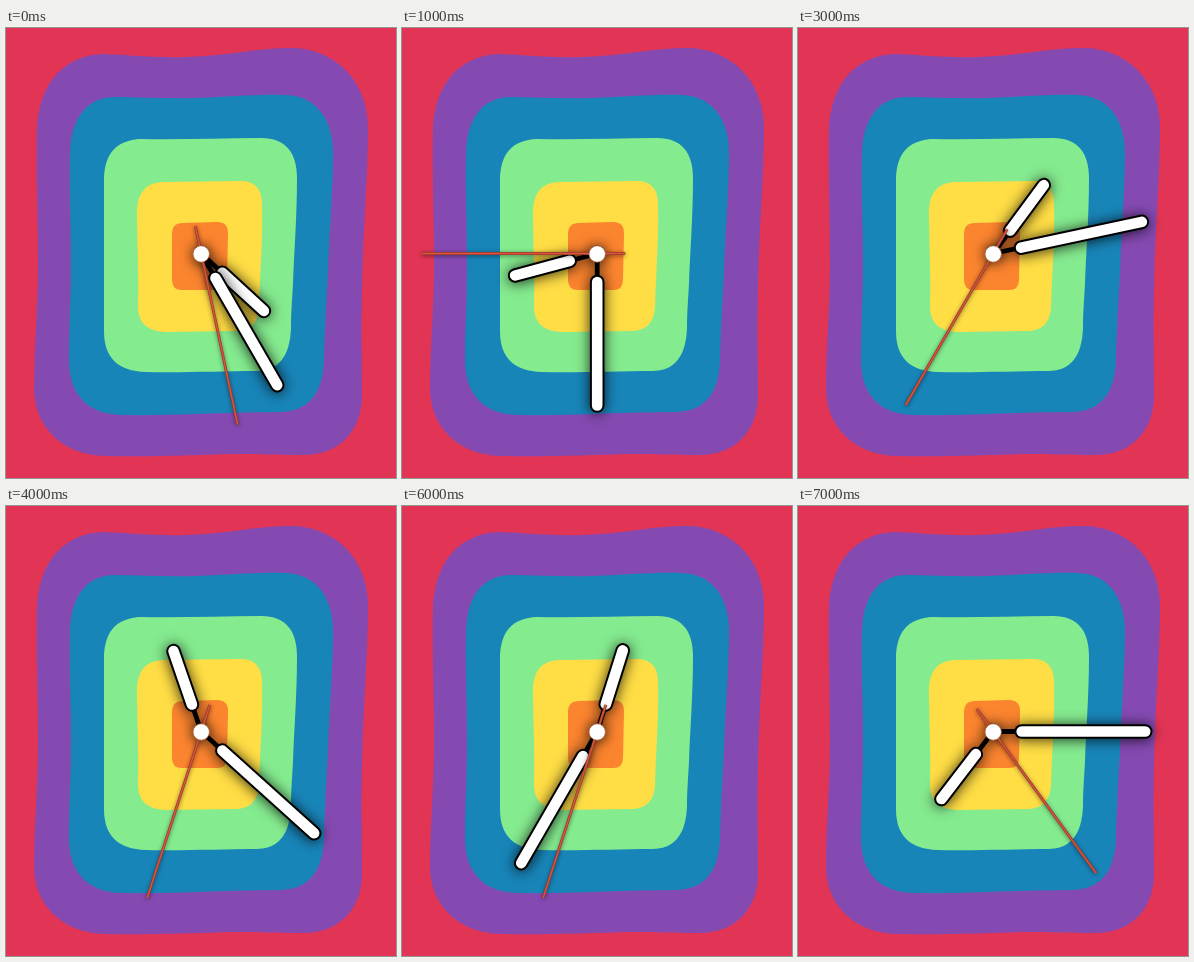
Animation of 390x450 px, one loop 8 s. Source, as an HTML page:

```html
<!DOCTYPE html>
<html lang="en">
<head>
<meta charset="utf-8">
<title>Rainbow clock</title>
<style>
  html, body { margin: 0; width: 100%; height: 100%; overflow: hidden; background: #e23555; }
  svg { display: block; width: 390px; height: 450px; }
  .hand { filter: drop-shadow(0 1.5px 7px rgba(0, 0, 0, .8)); }
  .sweep { filter: drop-shadow(0 1px 2px rgba(0, 0, 0, .5)); }
  line { stroke: #000; stroke-linecap: round; }
  .neck { stroke-width: 4.8; }
  .edge { stroke-width: 14.6; }
  .fill { stroke: #fff; stroke-width: 10.6; }
  .needle { stroke: #8f3a30; stroke-width: 2.8; stroke-linecap: butt; }
  .core { stroke: #e0533a; stroke-width: 1.4; stroke-linecap: butt; }
</style>
</head>
<body>
<svg viewBox="0 0 390 450">
  <rect width="390" height="450" fill="#e23555"/>
  <path fill="#854ab2" d="M98 26C125 27 150 30 180 29C220 28 250 20 285 20C328 20 362 52 362 100C362 150 357 200 356 260C355 300 356 335 356 368C356 402 334 427 298 427C270 427 255 426 230 426C190 427 145 429 100 428C60 428 28 402 28 360C28 320 32 280 32 235C32 190 30 145 31 98C34 55 58 27 98 26Z"/>
  <path fill="#1885b9" d="M107 69C135 69 160 71 190 70C225 69 250 66 280 67C309 68 327 90 327 125C327 165 323 205 322 245C320 280 319 300 318 332C317 365 303 383 275 384C220 384 165 388 115 387C82 386 63 367 63 332C63 300 65 270 65 235C65 196 63 160 64 125C65 91 80 70 107 69Z"/>
  <path fill="#85eb8f" d="M135 111C175 112 215 110 255 110C280 110 291 125 291 150C291 190 288 225 287 255C286 275 285 285 285 300C284 328 273 343 250 343C215 343 175 345 140 344C112 343 98 330 98 303L98 225L98 153C98 126 110 112 135 111Z"/>
  <path fill="#ffdd45" d="M159 154L234 153C249 153 256 161 256 176C257 210 254 245 253 279C252 295 244 303 228 303L160 304C141 303 132 295 132 278C133 245 131 215 131 183C132 163 141 154 159 154Z"/>
  <path fill="#fb842f" d="M177 195L211 194Q222 194 222 205L221 252Q221 262 211 262L176 262Q166 262 166 252L166 206Q166 195 177 195Z"/>
  <g transform="translate(195.2 225.5)">
    <circle class="hand" r="8"/>
    <g class="hand"><g id="hour"></g></g>
    <g class="hand"><g id="minute"></g></g>
    <g class="sweep">
      <g id="second">
        <line class="needle" y1="28" y2="-175"/>
        <line class="core" y1="28" y2="-175"/>
      </g>
    </g>
    <circle cy=".5" r="8.2" fill="#fff" stroke="#b5623a" stroke-width=".7"/>
  </g>
</svg>
<script>
  // One time of day per second of the loop: hour, minute, second
  const times = [
    [4, 25, 28], [8, 30, 45], [11, 3, 17], [1, 13, 35],
    [11, 22, 33], [11, 41, 40], [12, 35, 33], [7, 15, 24]
  ];
  const [hour, minute, second] = ['hour', 'minute', 'second'].map(id => document.getElementById(id));

  const line = (name, from, to) => `<line class="${name}" y1="${-from}" y2="${-to}"/>`;
  const baton = length =>
    line('neck', 0, 28) + line('edge', 28.5, length) + line('fill', 28.5, length);
  const turn = (hand, degrees) => hand.setAttribute('transform', `rotate(${degrees})`);

  hour.innerHTML = baton(85);
  minute.innerHTML = baton(152);

  const start = performance.now();
  function draw() {
    const elapsed = Math.max(0, performance.now() - start);
    const [h, m, s] = times[Math.floor(elapsed / 1000) % times.length];
    turn(hour, h * 30 + m / 2);
    turn(minute, m * 6);
    turn(second, s * 6);
    requestAnimationFrame(draw);
  }
  draw();
</script>
</body>
</html>
```
